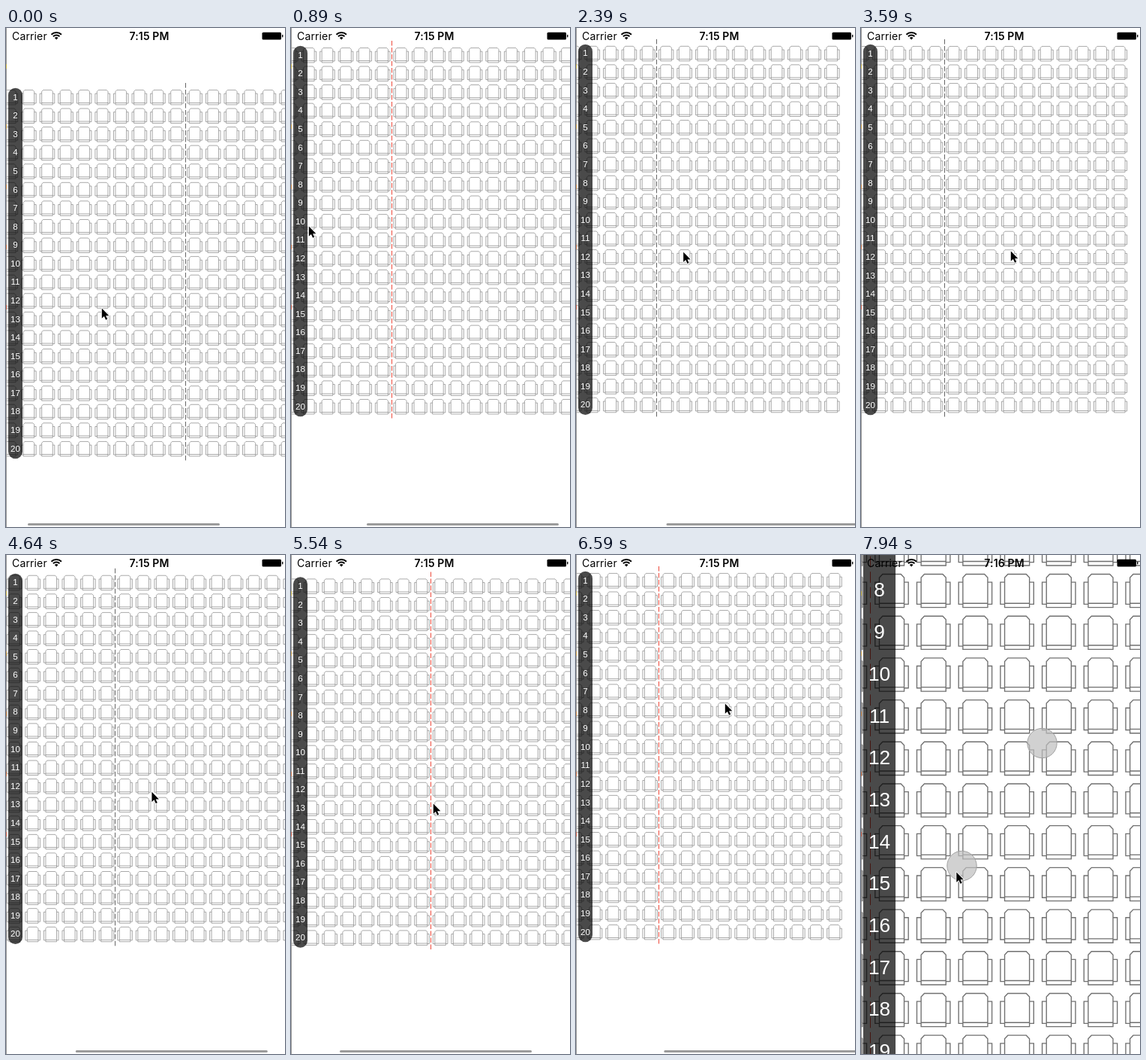
An HTML page with a canvas for the animation above (8 s loop, 372 px wide and 663 px high).

```html
<!DOCTYPE html>
<html lang="en">
<head>
<meta charset="utf-8">
<title>Seat picker</title>
<style>
html, body { margin: 0; width: 100%; height: 100%; overflow: hidden; background: #fff; }
canvas { display: block; }
</style>
</head>
<body>
<canvas id="stage" width="372" height="663"></canvas>
<script>
const W = 372, H = 663, LOOP = 8000;
const ROWS = 20, COLS = 20, PITCH = 24.58;
const REST_X = 111;
const PINCH = { x: 188, y: 331.5, start: 7040, end: 7940, zoom: 2.266 };
const ctx = document.getElementById('stage').getContext('2d');

const clamp = v => Math.max(0, Math.min(1, v));
const linear = (t, from, to) => clamp((t - from) / (to - from));
const ease = (t, from, to) => {
  const p = linear(t, from, to);
  return p * p * (3 - 2 * p);
};
const snap = v => Math.floor(v) + 0.5;

// The picture advances in 150 ms steps, with one slightly short step.
function step(t) {
  const from = t < 890 ? 0 : 890;
  return from + Math.floor((t - from) / 150) * 150;
}

// Aisle x and first row y: flick, bounce, two drags, return.
function scroll(t) {
  const bounce = ease(t, 1640, 2540);
  const drag1 = ease(t, 3740, 4790);
  const drag2 = ease(t, 5090, 5540);
  const back = ease(t, 5540, 6590);
  return {
    x: 239 - 175.5 * linear(t, 0, 1490) + 47.5 * bounce + 37 * drag1 + 38.5 * drag2 - 75.8 * back,
    y: 31 + 61 * Math.exp(-t / 356) + 3 * bounce + 3 * drag1 + 4.5 * drag2 - 7.5 * back
  };
}

// Pointer stops: time, x, y
const stops = [
  [0, 127, 371], [890, 23, 262], [1640, 107, 297], [3590, 199, 295],
  [5540, 189, 329], [6590, 198, 196], [7040, 157, 374]
];

function pointer(t) {
  const i = Math.max(1, stops.findIndex(k => k[0] > t));
  const [t0, x0, y0] = stops[i - 1], [t1, x1, y1] = stops[i];
  const p = linear(t, t0, t1);
  return { x: x0 + (x1 - x0) * p, y: y0 + (y1 - y0) * p };
}

function seat(cx, cy, s) {
  const X = v => cx + v * s, Y = v => cy + v * s;
  ctx.moveTo(X(-7.3), Y(7.5));
  ctx.lineTo(X(-7.3), Y(-7.6));
  ctx.lineTo(X(-5.4), Y(-9.6));
  ctx.lineTo(X(5.4), Y(-9.6));
  ctx.lineTo(X(7.3), Y(-7.6));
  ctx.lineTo(X(7.3), Y(7.5));
  ctx.rect(X(-7.3), Y(7.5), 14.6 * s, 2.4 * s);
  for (const side of [-1, 1]) {
    ctx.moveTo(X(7.5 * side), Y(-4.9));
    ctx.lineTo(X(9.8 * side), Y(-4.9));
    ctx.lineTo(X(9.8 * side), Y(8));
    ctx.lineTo(X(7.5 * side), Y(8));
  }
}

function seats(x, y, s) {
  ctx.beginPath();
  for (let r = 0; r < ROWS; r++) {
    for (let c = 0; c < COLS; c++) {
      const cx = x + 0.3 + (c - COLS / 2 + 0.5) * PITCH * s;
      seat(cx, y + r * PITCH * s, s);
    }
  }
  ctx.strokeStyle = '#707070';
  ctx.lineWidth = 0.6 * s;
  ctx.stroke();
}

function aisle(x, y, s, t) {
  const red = t >= 600 && t < 1300 || t >= 4700;
  ctx.save();
  ctx.strokeStyle = red ? '#ee4b3c' : '#666';
  ctx.lineWidth = 1;
  ctx.setLineDash([6.5 * s, 2.5 * s]);
  ctx.beginPath();
  ctx.moveTo(snap(x), y - 19 * s);
  ctx.lineTo(snap(x), y + 483 * s);
  ctx.stroke();
  ctx.restore();
}

function pill(x, y, w, h, r, fill) {
  ctx.fillStyle = fill;
  ctx.beginPath();
  ctx.roundRect(x, y, w, h, r);
  ctx.fill();
}

function label(text, x, y, font, align, fill) {
  ctx.font = font;
  ctx.textAlign = align;
  ctx.fillStyle = fill;
  ctx.fillText(text, x, y);
}

function rowBar(y, s) {
  pill(3, y - 12.2 * s, 19 * s, (PITCH * ROWS + 0.8) * s, 9.5 * s, 'rgba(0,0,0,0.71)');
  const font = `${11.6 * s}px "Liberation Sans", Arial, sans-serif`;
  for (let r = 0; r < ROWS; r++) {
    label(r + 1, 3 + 9.5 * s, y + (r * PITCH + 3.6) * s, font, 'center', '#fff');
  }
}

function scrollbar(x, t) {
  const shown = 1 - linear(t, 2600, 3000) + (t >= 3740 ? 1 : 0) - linear(t, 6650, 7000);
  const over = Math.max(0, REST_X - x);
  const left = over ? 117 + over : 29 + (239 - x) * 0.686;
  ctx.globalAlpha = clamp(shown);
  pill(left, 658, 256 - over, 3, 1.5, '#9b9b9b');
  ctx.globalAlpha = 1;
}

// Sliver of the desktop beside the window
function edge() {
  ctx.fillStyle = '#999';
  ctx.fillRect(0, 0, 1, H);
  for (let i = 0; i < 5; i++) {
    ctx.fillStyle = `hsl(${50 - i * 10}, 55%, 55%)`;
    ctx.fillRect(0, 48 + i * 80, 1, 6);
  }
}

function wifi(x, y) {
  const a = Math.PI / 4;
  ctx.strokeStyle = '#000';
  ctx.lineWidth = 2;
  for (const r of [9.5, 6]) {
    ctx.beginPath();
    ctx.arc(x, y, r, -Math.PI + a, -a);
    ctx.stroke();
  }
  ctx.beginPath();
  ctx.moveTo(x, y);
  ctx.arc(x, y, 3.4, -Math.PI + a, -a);
  ctx.fill();
}

function statusBar(t) {
  ctx.letterSpacing = '0.15px';
  label('Carrier', 8, 16, '14px Inter, Roboto, sans-serif', 'left', '#000');
  label(t < 7190 ? '7:15 PM' : '7:16 PM', 191, 16, '600 14px Inter, Roboto, sans-serif', 'center', '#000');
  ctx.letterSpacing = '0px';
  wifi(67.2, 15.5);
  pill(341.5, 5.7, 25.5, 9.8, 1.5, '#000');
  pill(368, 8.8, 1.4, 3.6, 0.7, '#000');
}

function touch(x, y) {
  ctx.beginPath();
  ctx.arc(x, y, 19.7, 0, Math.PI * 2);
  ctx.fillStyle = 'rgba(190,190,190,0.7)';
  ctx.fill();
  ctx.strokeStyle = '#a2a2a2';
  ctx.lineWidth = 1;
  ctx.stroke();
}

const arrowShape = new Path2D('M0 0V15L3.5 11.8L6 17.3L8.4 16.3L6 11H10.8Z');

function arrow(x, y) {
  ctx.save();
  ctx.translate(x + 0.8, y + 1.5);
  ctx.scale(0.88, 0.88);
  ctx.lineJoin = 'round';
  ctx.strokeStyle = '#fff';
  ctx.lineWidth = 2;
  ctx.stroke(arrowShape);
  ctx.fillStyle = '#000';
  ctx.fill(arrowShape);
  ctx.restore();
}

function draw(t) {
  let { x, y } = scroll(t);
  let tip = pointer(t);
  const pinching = t >= PINCH.start;
  const s = 1 + (PINCH.zoom - 1) * linear(t, PINCH.start, PINCH.end);
  const dx = 53.5 * s / PINCH.zoom, dy = 81.5 * s / PINCH.zoom;
  if (pinching) {
    x = PINCH.x + (x - PINCH.x) * s;
    y = PINCH.y + (y - PINCH.y) * s;
    tip = { x: PINCH.x - dx - 8, y: PINCH.y + dy + 7 };
  }

  ctx.fillStyle = '#fff';
  ctx.fillRect(0, 0, W, H);
  seats(x, y, s);
  aisle(x, y, s, t);
  rowBar(y, s);
  scrollbar(x, t);
  edge();
  statusBar(t);
  if (pinching) {
    touch(PINCH.x + dx, PINCH.y - dy);
    touch(PINCH.x - dx, PINCH.y + dy);
  }
  arrow(tip.x, tip.y);
}

const begin = performance.now();
function tick() {
  draw(step((performance.now() - begin) % LOOP));
  requestAnimationFrame(tick);
}
tick();
</script>
</body>
</html>
```
